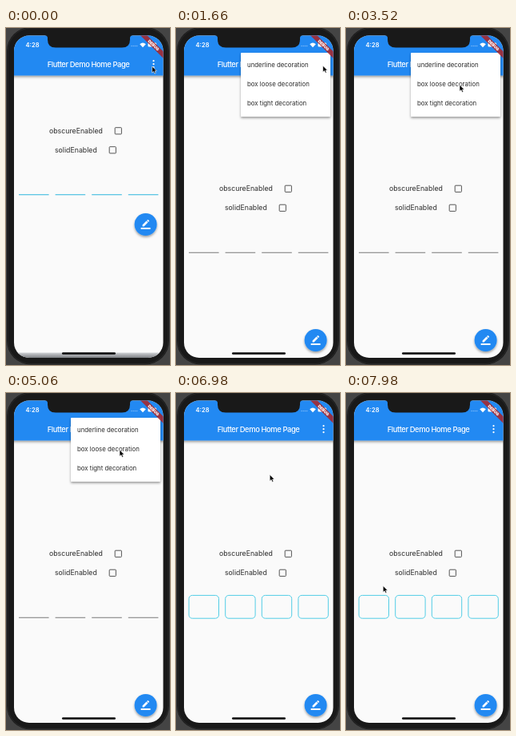
Recreate the animation shown at these times as an HTML page. Size 205 px wide and 422 px high, loop 8 s.

```html
<!DOCTYPE html>
<html lang="en">
<head>
<meta charset="utf-8">
<title>Flutter Demo Home Page</title>
<style>
  html, body { margin: 0; width: 100%; height: 100%; overflow: hidden; background: #444; }
  svg { display: block; width: 100vw; height: 100vh; }
  text { font-family: Inter, Roboto, sans-serif; fill: #2b2b2b; }
  .title { font-size: 9.4px; font-weight: 500; letter-spacing: -.41px; fill: #fff; text-anchor: middle; }
  .clock { font-size: 7.6px; font-weight: 600; fill: #fff; }
  .label { font-size: 8.75px; }
  .item { font-size: 7.85px; }
  .ribbon { font-size: 5px; font-weight: 900; fill: #fff; text-anchor: middle; }
</style>
</head>
<body>
<svg viewBox="0 0 205 422" preserveAspectRatio="none">
  <defs>
    <clipPath id="screen"><rect x="10" y="9.5" width="186.5" height="403.5" rx="19"/></clipPath>
    <clipPath id="card"><rect id="cardClip" x="81" y="31" width="112" height="80" rx="1"/></clipPath>
    <filter id="soft" x="-30%" y="-30%" width="160%" height="170%">
      <feDropShadow dx="0" dy="1.8" stdDeviation="1.7" flood-opacity=".38"/>
    </filter>
    <linearGradient id="tray" x2="0" y2="1">
      <stop stop-color="#d0d2d5"/><stop offset="1" stop-color="#777a7e"/>
    </linearGradient>
  </defs>

  <rect width="205" height="422" fill="#444"/>
  <rect x="1" y="-1" width="203" height="422.5" rx="30" fill="#191919"/>
  <rect x="2.2" y="0" width="200.6" height="420.5" rx="29" fill="none" stroke="#2c2c2c" stroke-width=".8"/>

  <g clip-path="url(#screen)">
    <rect x="10" y="9" width="187" height="405" fill="#fafafa"/>
    <rect x="6" y="5" width="195" height="54.5" fill="#2189f2" filter="url(#soft)"/>
    <text class="title" x="103" y="48.8">Flutter Demo Home Page</text>
    <g fill="#fff">
      <circle cx="184.5" cy="41.2" r="1.1"/><circle cx="184.5" cy="45.2" r="1.1"/><circle cx="184.5" cy="49.2" r="1.1"/>
    </g>

    <g id="body">
      <text class="label" x="54" y="204.3">obscureEnabled</text>
      <text class="label" x="61" y="228.3">solidEnabled</text>
      <g fill="none" stroke="#555" stroke-width="1">
        <rect x="136.2" y="197.2" width="8.2" height="8.2" rx=".7"/>
        <rect x="129.2" y="221.2" width="8.2" height="8.2" rx=".7"/>
      </g>
      <g id="lines" stroke-width="1.1"></g>
      <g id="boxes" fill="none" stroke="#52cde6" stroke-width="1"></g>
    </g>

    <g id="fab">
      <circle cx="174.6" cy="391" r="14" fill="#2189f2" filter="url(#soft)"/>
      <path transform="translate(168.6 385) scale(.497)" fill="#fff" d="M17.75 7L14 3.25l-10 10V17h3.75l10-10zm2.96-2.96c.39-.39.39-1.02 0-1.41L18.37.29c-.39-.39-1.02-.39-1.41 0L15 2.25 18.75 6l1.96-1.96zM0 20h24v4H0z"/>
    </g>

    <rect id="tray-strip" x="10" y="406.5" width="187" height="7" fill="url(#tray)"/>

    <g id="menu">
      <rect id="cardBack" x="81" y="31" width="112" height="80" rx="1" fill="#fff" filter="url(#soft)"/>
      <g clip-path="url(#card)">
        <rect id="press" x="81" y="58.5" width="112" height="24" fill="#000"/>
        <g id="items"></g>
      </g>
    </g>

    <text class="clock" x="24.5" y="23.8">4:28</text>
    <g fill="#fff">
      <g opacity=".45">
        <circle cx="157" cy="22.5" r=".7"/><circle cx="159.2" cy="22.5" r=".7"/>
        <circle cx="161.4" cy="22.5" r=".7"/><circle cx="163.6" cy="22.5" r=".7"/>
      </g>
      <path d="M167.2 20.2Q171 16.6 174.8 20.2L171 24.2Z"/>
      <rect x="177.5" y="18.4" width="10.5" height="5.2" rx="1.3"/>
    </g>
    <g transform="translate(196.5 9.5) rotate(45)">
      <rect x="-24" y="14" width="48" height="6" fill="#a8262c" opacity=".88"/>
      <text class="ribbon" x="0" y="18.8">DEBUG</text>
    </g>
    <rect x="70" y="406.2" width="67" height="2.6" rx="1.3" fill="#000"/>
  </g>

  <path d="M48.500 9H158.500Q155 9.500 155 12.500V14.500Q155 24.500 145 24.500H62Q52 24.500 52 14.500V12.500Q52 9.500 48.500 9Z" fill="#191919"/>

  <path id="cursor" d="M0 0V8L1.9 6.3 3.2 9.1 4.6 8.500 3.400 5.800H5.800Z" fill="#000" stroke="#fff" stroke-width=".6" stroke-linejoin="round"/>
</svg>

<script>
const LOOP = 8000, SHRINK = 20, OPEN = 60, PRESS = 6200, PICK = 6420, CLOSE = 6470;
const KEYBOARD = 145, CARD = { right: 193, w: 112, h: 80 };
const NS = "http://www.w3.org/2000/svg";
const $ = id => document.getElementById(id);
const clamp = x => Math.max(0, Math.min(1, x));
const span = (x, a, b) => clamp((x - a) / (b - a));
const ease = x => x * x * (3 - 2 * x);

function add(parent, tag, attrs, text = "") {
  const el = document.createElementNS(NS, tag);
  for (const key in attrs) el.setAttribute(key, attrs[key]);
  el.textContent = text;
  return $(parent).appendChild(el);
}

for (let i = 0; i < 4; i++) {
  const x = 16 + i * 45.6;
  add("lines", "path", { d: `M${x} 281.2h37.6` });
  add("boxes", "rect", { x: x + .1, y: 253.4, width: 37.4, height: 28.8, rx: 4.2 });
}
const items = ["underline", "box loose", "box tight"].map((name, i) =>
  add("items", "text", { class: "item", x: 89, y: 49 + i * 24 }, name + " decoration"));

// time, x, y of the pointer tip
const trail = [
  [0, 182.6, 48], [300, 183.6, 47.2], [1750, 183.6, 47.2], [2400, 160, 54.5], [2600, 160, 54.5],
  [3200, 142, 71.3], [5800, 142, 71.3], [6300, 141.8, 70.2], [6650, 141.8, 70.2],
  [7240, 100.2, 124.500], [7400, 100.2, 124.500], [7940, 46.3, 241.5], [LOOP, 46.3, 241.5]
];

function pointer(t) {
  const i = trail.findIndex(p => p[0] > t);
  const [t0, x0, y0] = trail[i - 1], [t1, x1, y1] = trail[i];
  const k = ease(span(t, t0, t1));
  return [x0 + (x1 - x0) * k, y0 + (y1 - y0) * k];
}

function drawMenu(t) {
  const v = t < CLOSE ? span(t, OPEN, OPEN + 300) : 1 - span(t, CLOSE + 100, CLOSE + 300);
  const unit = 1 / 4.5;
  const w = CARD.w * (.5 + .5 * span(v, 0, unit));
  const h = CARD.h * span(v, 0, 3 * unit);
  for (const id of ["cardBack", "cardClip"]) {
    $(id).setAttribute("x", CARD.right - w);
    $(id).setAttribute("width", w);
    $(id).setAttribute("height", h);
  }
  $("menu").style.display = v > 0 ? "" : "none";
  $("menu").setAttribute("opacity", span(v, 0, 1 / 3));
  items.forEach((el, i) => {
    const start = (i + 1) * unit;
    el.setAttribute("opacity", span(v, start, Math.min(1, start + 1.5 * unit)));
  });
  $("press").setAttribute("opacity", .07 * span(t, PRESS, PRESS + 200));
}

function render(t) {
  const raised = t < SHRINK, picked = t >= PICK;
  $("body").setAttribute("transform", `translate(0 ${raised ? -KEYBOARD / 2 : 0})`);
  $("fab").setAttribute("transform", `translate(0 ${raised ? -KEYBOARD : 0})`);
  $("tray-strip").style.display = raised ? "" : "none";
  $("lines").setAttribute("stroke", raised ? "#2bb5dc" : "#777");
  $("lines").style.display = picked ? "none" : "";
  $("boxes").style.display = picked ? "" : "none";
  drawMenu(t);
  $("cursor").setAttribute("transform", `translate(${pointer(t)})`);
}

const start = performance.now();
function tick() {
  render((performance.now() - start) % LOOP);
  requestAnimationFrame(tick);
}
tick();
</script>
</body>
</html>
```
